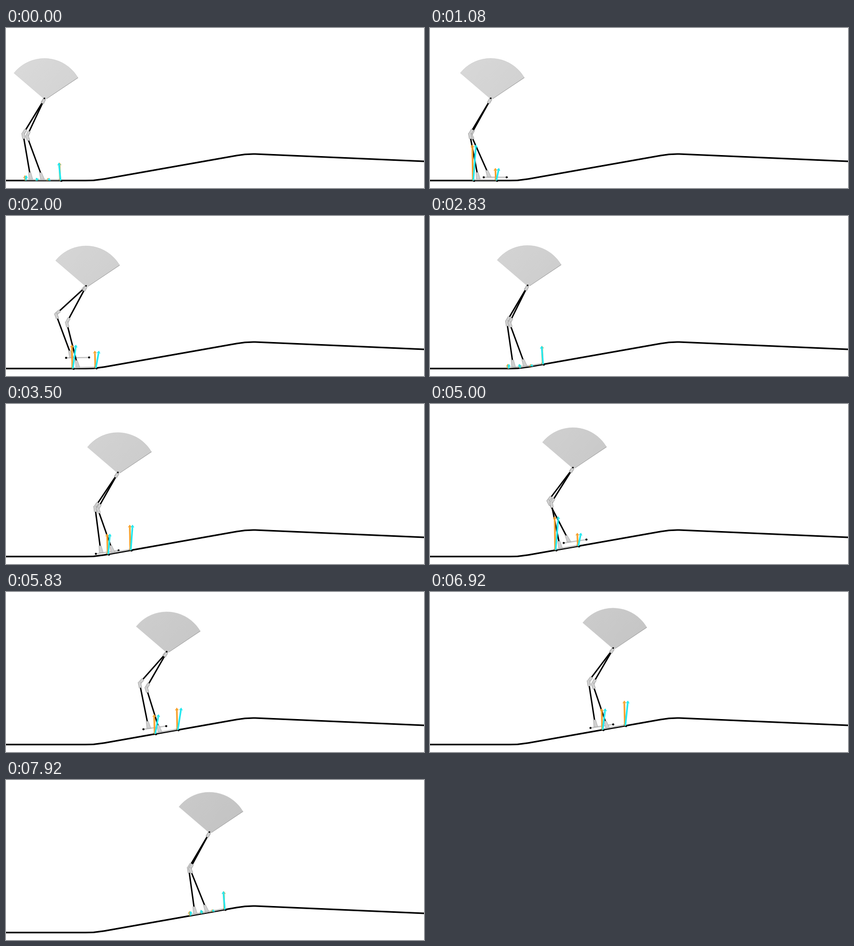
Animation, 800 px wide and 306 px high, one loop 8 s. Source, as an HTML page with a canvas:

```html
<!DOCTYPE html>
<html lang="en">
<head>
<meta charset="utf-8">
<title>Walking legs on a slope</title>
<style>
  html, body { margin: 0; width: 100%; height: 100%; overflow: hidden; background: #fff; }
  canvas { display: block; width: 800px; height: 306px; }
</style>
</head>
<body>
<canvas id="stage" width="800" height="306"></canvas>
<script>
const ctx = document.getElementById('stage').getContext('2d');

const LOOP = 8000, FRAMES = 96, FRAME = LOOP / FRAMES;
const STEP = 565, LIFT_OFF = 100, LIFT = 19;
const THIGH = 78.2, SHANK = 84.6, FOOT = 44;
const FLAT = 291.8, SLOPE = 0.177;
const ORANGE = '#f8a12c', CYAN = '#22e8f0', GREY = '#d0d0d0', EDGE = '#9c9c9c';

// [time, left edge of the fan, top of the fan]
const BODY = [
  [0, 15, 58], [833, 47.5, 58], [1667, 81.5, 57.4], [2500, 114.5, 56.4],
  [3333, 149, 55.7], [4167, 182, 49], [5000, 215, 45], [5833, 249, 37.7],
  [6667, 282.5, 32.5], [7500, 314.5, 26], [8000, 334, 22.5]
];
// [time since touchdown, heel load, toe load, lean of the cyan arrow]
const LOAD = [
  [0, 1, 32, -3], [128, 41, 49, 5], [180, 38, 44, 8], [220, 34, 37, 7],
  [400, 54, 28, 7], [530, 68, 23, 6], [575, 9, 4, 2], [640, 0, 0, 0]
];

function sample(keys, t, col) {
  let i = 1;
  while (i < keys.length - 1 && keys[i][0] < t) i++;
  const a = keys[i - 1], b = keys[i];
  const u = Math.min(1, Math.max(0, (t - a[0]) / (b[0] - a[0])));
  return a[col] + (b[col] - a[col]) * u;
}

const mix = (a, b, u) => a + (b - a) * u;
const along = (a, b, px) => {
  const d = Math.hypot(b.x - a.x, b.y - a.y);
  return { x: a.x + (b.x - a.x) * px / d, y: a.y + (b.y - a.y) * px / d };
};

function line(a, b, width, color) {
  ctx.lineWidth = width;
  ctx.strokeStyle = color;
  ctx.beginPath();
  ctx.moveTo(a.x, a.y);
  ctx.lineTo(b.x, b.y);
  ctx.stroke();
}

function dot(x, y, r) {
  ctx.fillStyle = '#000';
  ctx.beginPath();
  ctx.arc(x, y, r, 0, 7);
  ctx.fill();
}

function sleeve(a, b, width) {
  line(a, b, width, EDGE);
  line(a, b, width - 1.6, GREY);
}

const slopeY = x => 243.9 - SLOPE * (x - 441);

function groundY(x) {
  if (x < 152) return FLAT;
  if (x < 188) return FLAT - (FLAT - slopeY(188)) * ((x - 152) / 36) ** 2;
  return slopeY(x);
}

function drawGround() {
  ctx.lineWidth = 3;
  ctx.strokeStyle = '#000';
  ctx.beginPath();
  ctx.moveTo(0, FLAT);
  ctx.lineTo(152, FLAT);
  ctx.quadraticCurveTo(170, FLAT, 188, slopeY(188));
  ctx.lineTo(441, slopeY(441));
  ctx.quadraticCurveTo(459, slopeY(459), 477, 241.1);
  ctx.lineTo(800, 255);
  ctx.stroke();
}

function drawFan(hip, t) {
  const shade = Math.round(mix(217, 201, t / LOOP));
  const grad = ctx.createLinearGradient(hip.x - 40, hip.y - 70, hip.x + 30, hip.y - 10);
  grad.addColorStop(0, `rgb(${shade},${shade},${shade})`);
  grad.addColorStop(1, `rgb(${shade - 5},${shade - 5},${shade - 5})`);
  const c = { x: hip.x, y: hip.y - 3 }, radius = 74.7;
  const left = Math.atan2(-47, -58.5), right = Math.atan2(-38, 64.5);
  ctx.beginPath();
  ctx.moveTo(hip.x + 1, hip.y + 1);
  ctx.arc(c.x, c.y, radius, left, right);
  ctx.closePath();
  ctx.fillStyle = grad;
  ctx.fill();
  ctx.lineWidth = 0.5;
  ctx.strokeStyle = '#c0c0c0';
  ctx.stroke();
  line({ x: hip.x + 4, y: hip.y - 0.5 },
       { x: c.x + radius * Math.cos(right), y: c.y + radius * Math.sin(right) }, 0.8, '#8c8c8c');
}

// Position of the heel on the ground for the nth footstep
const heelX = n => 37 + 22.5 * n;

function planted(n) {
  const x = heelX(n), y = groundY(x) - 1.7;
  const angle = Math.atan2(groundY(x + FOOT) - 1.7 - y, FOOT);
  return { x, y, angle };
}

function swinging(n, elapsed) {
  const u = Math.max(0, (elapsed - LIFT_OFF) / (STEP - LIFT_OFF));
  const from = planted(n), to = planted(n + 2);
  const w = u ** 1.5, s = w * w * (3 - 2 * w), arch = Math.sin(Math.PI * u);
  return {
    x: mix(from.x, to.x, s),
    y: mix(from.y, to.y, s) - LIFT * arch,
    angle: mix(from.angle, to.angle, s) * (1 - 0.35 * arch)
  };
}

function onFoot(foot, forward, up = 0) {
  const c = Math.cos(foot.angle), s = Math.sin(foot.angle);
  return { x: foot.x + forward * c + up * s, y: foot.y + forward * s - up * c };
}

function kneeOf(hip, ankle) {
  const dx = ankle.x - hip.x, dy = ankle.y - hip.y, d = Math.hypot(dx, dy);
  const a = (THIGH ** 2 - SHANK ** 2 + d * d) / (2 * d);
  const h = Math.sqrt(Math.max(0, THIGH ** 2 - a * a));
  return { x: hip.x + (dx * a - dy * h) / d, y: hip.y + (dy * a + dx * h) / d };
}

function drawLeg(hip, foot) {
  const ankle = onFoot(foot, 10, 4), toe = onFoot(foot, FOOT);
  const knee = kneeOf(hip, ankle);
  line(foot, toe, 2.4, '#c4c4c4');
  dot(foot.x, foot.y, 2);
  dot(toe.x, toe.y, 2);
  line(hip, knee, 2.7, '#000');
  line(knee, ankle, 2.7, '#000');
  sleeve(along(knee, hip, 10), along(knee, hip, -1), 5.8);
  sleeve(along(knee, ankle, -2), along(knee, ankle, 9), 6);
  sleeve(hip, along(hip, knee, 9), 5.8);

  const top = along(ankle, knee, 10), base = onFoot(foot, 10.5, 0.5);
  ctx.beginPath();
  ctx.moveTo(top.x - 2.2, top.y);
  ctx.lineTo(top.x + 2.2, top.y);
  ctx.lineTo(base.x + 3.8, base.y);
  ctx.lineTo(base.x - 3.8, base.y);
  ctx.closePath();
  ctx.fillStyle = GREY;
  ctx.fill();
  ctx.lineWidth = 0.7;
  ctx.strokeStyle = EDGE;
  ctx.stroke();
}

function arrow(from, dx, height, color) {
  const tip = { x: from.x + dx, y: from.y - height };
  const head = Math.min(5, height);
  const neck = along(tip, from, head);
  line(from, neck, 3.2, color);
  const nx = (tip.y - neck.y) / head * 3.6, ny = -(tip.x - neck.x) / head * 3.6;
  ctx.fillStyle = color;
  ctx.beginPath();
  ctx.moveTo(tip.x, tip.y);
  ctx.lineTo(neck.x + nx, neck.y + ny);
  ctx.lineTo(neck.x - nx, neck.y - ny);
  ctx.fill();
}

function drawLoad(foot, elapsed) {
  const lean = sample(LOAD, elapsed, 3);
  [[foot, 1], [onFoot(foot, FOOT), 2]].forEach(([point, col]) => {
    const force = sample(LOAD, elapsed, col);
    if (force < 3) return;
    const y = point.y + 1.5;
    if (force > 15) dot(point.x + 2.5, y + 0.8, 1.9);
    arrow({ x: point.x, y }, -1, force + 1, ORANGE);
    arrow({ x: point.x + 1, y }, lean - 1, force + 1, CYAN);
  });
}

function draw(t) {
  ctx.fillStyle = '#fff';
  ctx.fillRect(0, 0, 800, 306);
  drawGround();

  const hip = { x: sample(BODY, t, 1) + 58.5, y: sample(BODY, t, 2) + 78 };
  const steps = Math.floor((t + 10) / STEP);
  const elapsed = t + 10 - steps * STEP;
  const front = planted(steps + 1), back = swinging(steps, elapsed);

  drawFan(hip, t);
  drawLeg(hip, back);
  drawLeg(hip, front);
  dot(hip.x, hip.y - 1.5, 1.6);
  drawLoad(back, elapsed + STEP);
  drawLoad(front, elapsed);
}

function tick() {
  const t = performance.now() % LOOP;
  const frame = Math.min(FRAMES - 1, Math.floor((t + 4) / FRAME));
  draw(frame * FRAME);
  requestAnimationFrame(tick);
}
tick();
</script>
</body>
</html>
```
